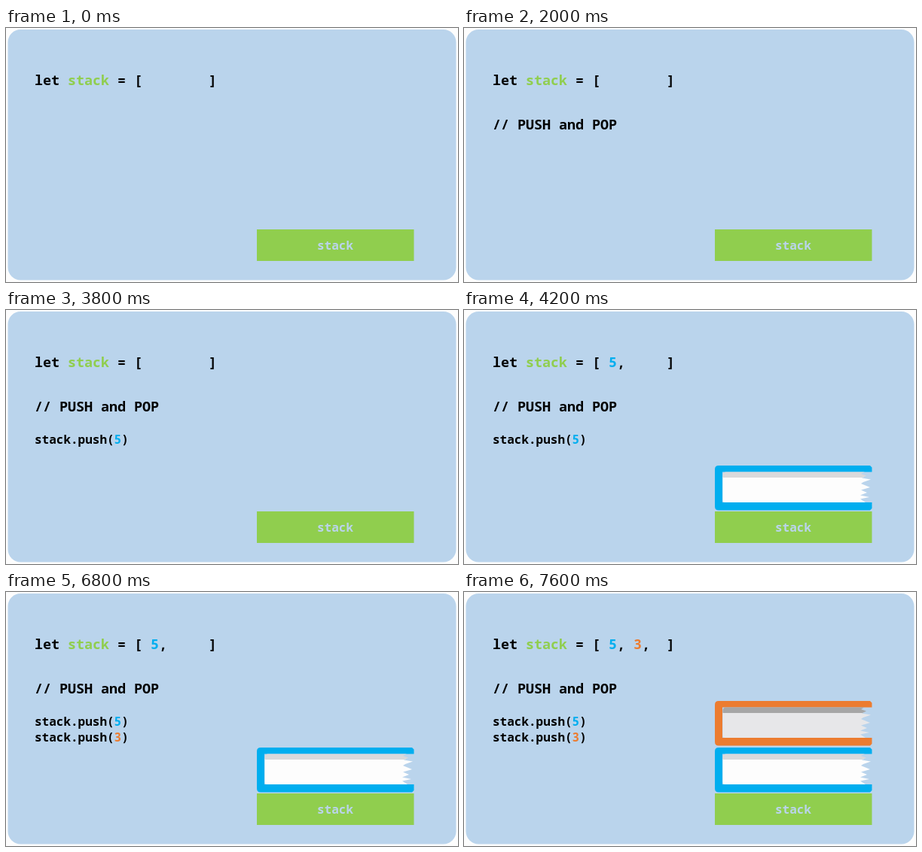
An HTML page that plays this animation: 600 by 338 pixels, repeating every 8000 ms.

```html
<!DOCTYPE html>
<html lang="en">
<head>
<meta charset="utf-8">
<title>Stack push</title>
<style>
  html, body { margin: 0; width: 100%; height: 100%; overflow: hidden; background: #fdfdfd; }
  svg { display: block; width: 600px; height: 338px; }

  text { font: 700 16px "Noto Sans Mono", "DejaVu Sans Mono", monospace; white-space: pre; }
  .big { font-size: 18.33px; }

  .panel { fill: #bad4ec; }
  .green { fill: #90ce4e; }
  .blue { fill: #00aeef; }
  .orange { fill: #ec7c30; }

  .five { --cover: #00aeef; --page: #fdfdfd; --shade: #d9d9db; }
  .three { --cover: #ec7c30; --page: #e7e7e9; --shade: #a6a6a6; }

  /* each step pops in once per loop */
  .step { animation: 8s step-end infinite; }
  .title { animation-name: title; }
  .call1 { animation-name: call1; }
  .arg1 { animation-name: arg1; }
  .push1 { animation-name: push1; }
  .call2 { animation-name: call2; }
  .arg2 { animation-name: arg2; }
  .push2 { animation-name: push2; }
  @keyframes title { 0% { opacity: 0 } 12.5%, 100% { opacity: 1 } }
  @keyframes call1 { 0% { opacity: 0 } 27.5%, 100% { opacity: 1 } }
  @keyframes arg1 { 0% { opacity: 0 } 40%, 100% { opacity: 1 } }
  @keyframes push1 { 0% { opacity: 0 } 52.5%, 100% { opacity: 1 } }
  @keyframes call2 { 0% { opacity: 0 } 65%, 100% { opacity: 1 } }
  @keyframes arg2 { 0% { opacity: 0 } 77.5%, 100% { opacity: 1 } }
  @keyframes push2 { 0% { opacity: 0 } 90%, 100% { opacity: 1 } }
</style>
</head>
<body>
<svg viewBox="0 0 600 338">
  <defs>
    <clipPath id="torn">
      <path d="M10 8H199L194 11 201 13.5 195 16.5 207 18.5 197 22 194 24 206 29 194 32.5 202 36 193 39.5 205 42 193 44.5 200 49H10Z"/>
    </clipPath>
    <g id="book">
      <path fill="var(--cover)" d="M5 0H206L208.500 2.500V8.500H10V49H208.500V57L206 59.500H5Q0 59.500 0 54.500V5Q0 0 5 0Z"/>
      <g clip-path="url(#torn)">
        <path fill="var(--page)" d="M10.500 15H210V49H13Q10.500 49 10.500 46Z"/>
        <path fill="var(--shade)" d="M10.500 16V13Q10.500 8.500 15 8.500H210V16Z"/>
      </g>
    </g>
  </defs>

  <rect class="panel" x="2.500" y="2" width="595" height="333.500" rx="17"/>

  <text class="big" x="38" y="75.500">let <tspan class="green">stack</tspan> = [</text>
  <text class="big" x="269" y="75.500">]</text>

  <rect class="green" x="333" y="268" width="208.500" height="42"/>
  <text class="panel" x="413" y="295">stack</text>

  <text class="big step title" x="38" y="135">// PUSH and POP</text>

  <text class="step call1" x="38" y="177.500">stack.push( )</text>
  <text class="blue step arg1" x="143.600" y="177.500">5</text>
  <g class="five step push1">
    <text class="big" x="192" y="75.500"><tspan class="blue">5</tspan>,</text>
    <use href="#book" x="333" y="207"/>
  </g>

  <text class="step call2" x="38" y="198.500">stack.push( )</text>
  <text class="orange step arg2" x="143.600" y="198.500">3</text>
  <g class="three step push2">
    <text class="big" x="225" y="75.500"><tspan class="orange">3</tspan>,</text>
    <use href="#book" x="333" y="145"/>
  </g>
</svg>
</body>
</html>
```
